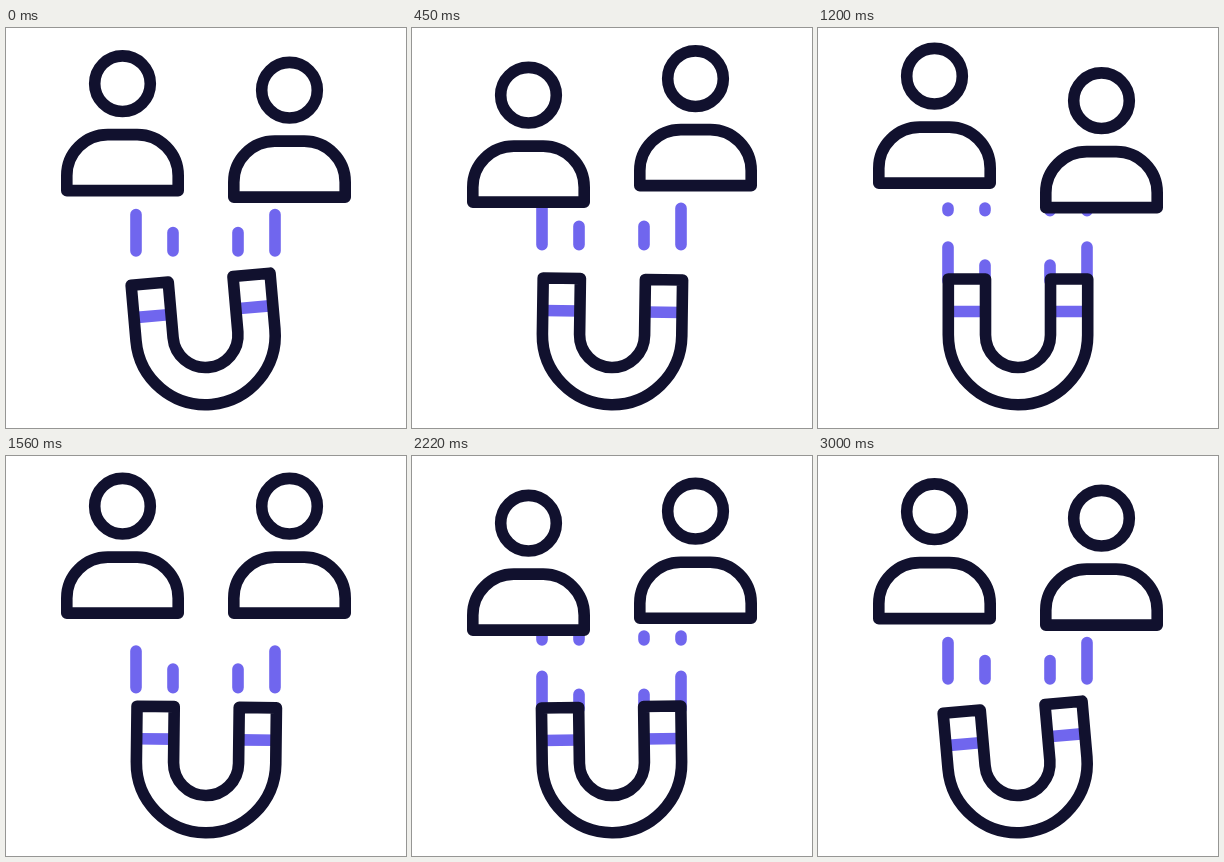
These frames come from a looping animation (400x400 px, 3030 ms). An HTML page:

```html
<!DOCTYPE html>
<html lang="en">
<head>
<meta charset="utf-8">
<title>Magnet attracting people</title>
<style>
  html, body { margin: 0; width: 100%; height: 100%; overflow: hidden; background: #fff; }
  svg { display: block; width: 100%; height: 100%; }
  .dark, .accent { fill: none; stroke-width: 11.6; stroke-linejoin: round; }
  .dark { stroke: #11112e; }
  .accent { stroke: #7066ee; }
  #streaks { stroke-linecap: round; }
</style>
</head>
<body>
<svg viewBox="0 0 400 400">
  <defs>
    <!-- Origin: middle of the shoulders' base line -->
    <g id="person" class="dark">
      <circle cy="-107" r="27.8"/>
      <path d="M-55.7 0V-15A41 41 0 0 1 -14.7 -56H14.7A41 41 0 0 1 55.7 -15V0Z"/>
    </g>
  </defs>
  <path id="streaks" class="accent"/>
  <g id="magnet">
    <path class="accent" d="M131 283.5H167M233 283.5H269"/>
    <path class="dark" d="M130.3 251H167.5V307A32.5 32.5 0 0 0 232.5 307V251H269.7V307A69.7 69.7 0 0 1 130.3 307Z"/>
  </g>
  <use id="left" href="#person"/>
  <use id="right" href="#person"/>
</svg>
<script>
const LOOP = 3030, SPAN = 3000, STEP = 30;
const [streaks, magnet, left, right] =
  ['streaks', 'magnet', 'left', 'right'].map(id => document.getElementById(id));

const smooth = u => u * u * (3 - 2 * u);
const clamp = (v, lo, hi) => Math.min(hi, Math.max(lo, v));

// One harmonic of the loop; a few of them make a person bob irregularly.
const wave = (t, n, amp, phase) => amp * Math.cos(2 * Math.PI * n * t / SPAN - phase);
const leftY = t => 166.6 + wave(t, 1, 3.86, -0.25) + wave(t, 2, 8.86, 2.62) + wave(t, 3, 1.37, -1.57);
const rightY = t => 165.7 + wave(t, 1, 4.73, 1.08) + wave(t, 2, 12.23, -1.62) + wave(t, 3, 2.29, 0.66);

// Cubic bezier easing with horizontal ends.
function ease(x, x1, x2) {
  let lo = 0, hi = 1;
  for (let i = 0; i < 24; i++) {
    const s = (lo + hi) / 2, r = 1 - s;
    if (3 * s * r * r * x1 + 3 * s * s * r * x2 + s * s * s < x) lo = s; else hi = s;
  }
  return smooth(lo);
}

// The magnet is pulled aside, released and swings out; once each way.
const swing = ms => 5 * Math.exp(-0.004 * ms) * Math.cos(0.007 * ms);
const pull = (t, from) => 5 * smooth(clamp((t - from) / 260, 0, 1));
function magnetAngle(t) {
  if (t < 1500) return -swing(t);
  if (t < 1760) return pull(t, 1500);
  if (t < 2740) return swing(t - 1760);
  return -pull(t, 2740);
}

// Streaks run upward along a fixed track and wrap around.
const TOP = 180, BOTTOM = 253, TRACK = BOTTOM - TOP;
function streak(x, length, shift) {
  let d = '';
  for (let k = 0; k < 4; k++) {
    const end = 223 - shift + k * TRACK;
    const y0 = clamp(end - length, TOP, BOTTOM), y1 = clamp(end, TOP, BOTTOM);
    if (y1 > y0) d += `M${x} ${y0}V${y1}`;
  }
  return d;
}

function draw(t) {
  const shift = 2 * TRACK * ease(t / SPAN, 0.41, 0.75);
  const pair = (offset, length) =>
    streak(199.5 - offset, length, shift) + streak(199.5 + offset, length, shift);
  streaks.setAttribute('d', pair(69.5, 36.5) + pair(32.5, 18.5));
  magnet.setAttribute('transform', `rotate(${magnetAngle(t)} 200 313)`);
  left.setAttribute('transform', `translate(116.5 ${leftY(t)})`);
  right.setAttribute('transform', `translate(283.5 ${rightY(t)})`);
}

const start = performance.now();
function tick() {
  const t = (performance.now() - start) % LOOP;
  draw(Math.floor(t / STEP) * STEP);
  requestAnimationFrame(tick);
}
tick();
</script>
</body>
</html>
```
